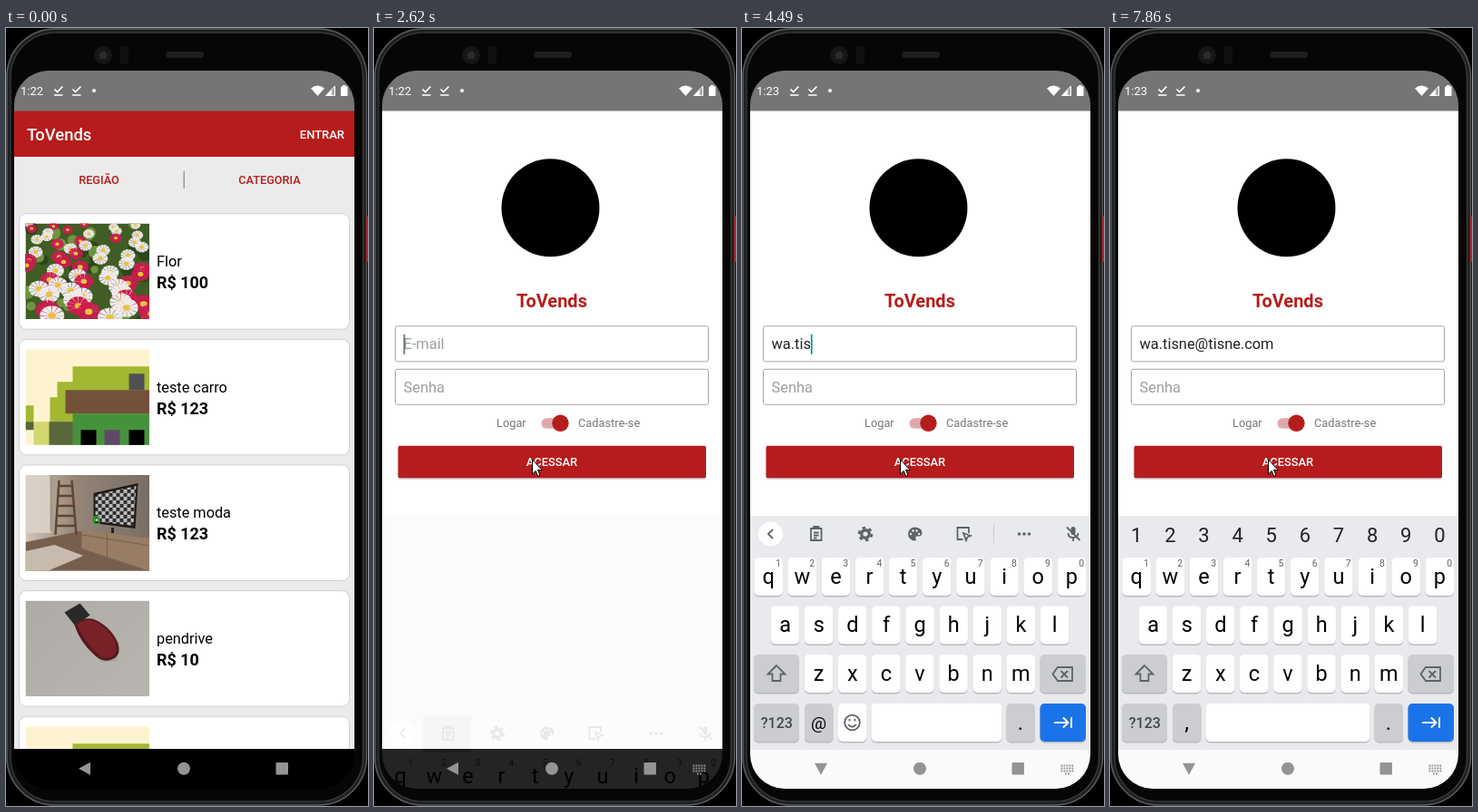
An HTML page that plays this animation: 399x858 px, repeating every 8000 ms.

```html
<!DOCTYPE html>
<html lang="pt">
<head>
<meta charset="utf-8">
<title>Login</title>
<style>
html, body { margin: 0; height: 100%; overflow: hidden; background: #000; }
svg { display: block; }
body > svg { width: 100vw; height: 100vh; }
text { font-family: Roboto, "Liberation Sans", sans-serif; white-space: pre; }
.m { text-anchor: middle; }
.b { font-weight: 500; }
.ico { fill: none; stroke: #5f6368; stroke-width: 1.8; }
</style>
</head>
<body>
<svg viewBox="0 0 399 858">
  <defs>
    <clipPath id="screen"><rect x="9" y="47" width="375" height="792" rx="38"/></clipPath>
    <clipPath id="page"><rect x="9" y="91" width="375" height="704"/></clipPath>
    <pattern id="check" width="8" height="8" patternUnits="userSpaceOnUse">
      <path fill="#bbb" d="M0 0h8v8h-8z"/><path fill="#2c2c2c" d="M0 0h4v4h-4zM4 4h4v4h-4z"/>
    </pattern>
    <linearGradient id="room" x2="1"><stop stop-color="#cfc5b8"/><stop offset=".4" stop-color="#948578"/><stop offset="1" stop-color="#7a6d63"/></linearGradient>
    <linearGradient id="desk" x2="1" y2="1"><stop stop-color="#aeaba7"/><stop offset="1" stop-color="#b9b5b0"/></linearGradient>
  </defs>

  <!-- phone body -->
  <rect width="399" height="858"/>
  <rect x="2" y="2" width="394" height="854" rx="52" fill="#060606" stroke="#1f2021" stroke-width="4"/>
  <rect x="1" y="1" width="396.5" height="856" rx="53" fill="none" stroke="#5a5d5f" stroke-width="1.4"/>
  <rect x="5" y="5" width="388.5" height="848" rx="49" fill="none" stroke="#3a3c3e" stroke-width="1.4"/>
  <rect x="397" y="208" width="2" height="50" fill="#b3202c"/>
  <circle cx="107" cy="30" r="10" fill="#151515"/><circle cx="107" cy="30" r="4.5" fill="#2b2b2d"/>
  <rect x="126" y="20" width="9" height="20" rx="2" fill="#111"/>
  <rect x="176" y="26" width="42" height="7" rx="3.5" fill="#1e1e1e"/>

  <g clip-path="url(#screen)">
    <rect x="9" y="47" width="375" height="792"/>

    <g id="list" clip-path="url(#page)">
      <rect x="9" y="91" width="375" height="704" fill="#ebebeb"/>
      <rect x="9" y="142" width="375" height="1.5" fill="#f4f4f4"/>
      <rect x="9" y="91" width="375" height="51" fill="#b71c1c"/>
      <text class="b" x="23" y="124" font-size="18.4" fill="#fff">ToVends</text>
      <text class="b" x="373" y="122" font-size="13" fill="#fff" text-anchor="end">ENTRAR</text>
      <g class="m b" font-size="12.7" fill="#b71c1c">
        <text x="102.5" y="172">REGIÃO</text><text x="290.5" y="172">CATEGORIA</text>
      </g>
      <rect x="195.5" y="158" width="1.5" height="19" fill="#9a9a9a"/>
      <g id="cards"></g>
    </g>

    <g id="login" clip-path="url(#page)">
      <rect x="9" y="91" width="375" height="704" fill="#fff"/>
      <g id="form">
        <circle cx="194.5" cy="327" r="54"/>
        <text class="m" x="196" y="437" font-size="20" font-weight="700" fill="#b71c1c">ToVends</text>
        <g fill="#fff" stroke="#a6a6a6">
          <rect x="23.5" y="457.5" width="345" height="39" rx="2"/>
          <rect x="23.5" y="505" width="345" height="39" rx="2"/>
        </g>
        <g font-size="16.4" fill="#9e9e9e">
          <text id="hint" x="32.5" y="483">E-mail</text>
          <text x="32.5" y="531">Senha</text>
          <text id="mail" x="32.5" y="483" fill="#212121"></text>
        </g>
        <rect id="caret" width="1.7" height="22"/>
        <g font-size="12.8" fill="#757575"><text x="135" y="569">Logar</text><text x="225" y="569">Cadastre-se</text></g>
        <rect x="184.5" y="559" width="29" height="11.5" rx="5.7" fill="#e0a9a9"/>
        <circle cx="205.5" cy="565.5" r="9.3" fill="#0002"/><circle cx="205.5" cy="564.5" r="9.2" fill="#b71c1c"/>
        <rect x="26.5" y="590.5" width="339.5" height="36" rx="2" fill="#0003"/>
        <rect x="26.5" y="589.5" width="339.5" height="35.5" rx="2" fill="#b71c1c"/>
        <text class="m b" x="196" y="612" font-size="12.9" fill="#fff">ACESSAR</text>
      </g>
    </g>

    <g id="board">
      <rect x="9" y="538" width="375" height="258" fill="#e8eaed"/>
      <rect x="9" y="796" width="375" height="43" fill="#fafafa"/>
      <g id="slide">
        <rect id="press" x="54" y="538" width="53" height="41" fill="#0003"/>
        <g id="tools">
          <circle cx="31.5" cy="558" r="13.5" fill="#fff"/>
          <path class="ico" d="M34 553l-5 5 5 5"/>
          <g class="ico">
            <path d="M76 552h11.500v13h-11.500zM79 552v-2h5.500v2M79 556.500h5.500M79 559.500h5.500M79 562.500h3.500"/>
            <circle cx="136" cy="558" r="4.300" stroke-width="3.400"/>
            <circle cx="136" cy="558" r="7" stroke-width="2.600" stroke-dasharray="3.660"/>
            <path d="M250 557v-6h-12.500v13h6M244 557l8 3-3.500 1.500-1.500 3.500z"/>
          </g>
          <path fill="#5f6368" d="M190.500 550.500a7.500 7.500 0 1 0 0 15q2-.5 1-2.500t1.500-2.500h2.500q3-.5 3-4a8 6 0 0 0-8-6z"/>
          <g fill="#e8eaed"><circle cx="186" cy="558" r="1.200"/><circle cx="188.500" cy="554.500" r="1.200"/><circle cx="192.500" cy="554.500" r="1.200"/><circle cx="195" cy="558" r="1.200"/></g>
          <path stroke="#c9cbce" d="M277.500 548v20"/>
          <g fill="#5f6368"><circle cx="305.500" cy="558" r="1.800"/><circle cx="311" cy="558" r="1.800"/><circle cx="316.500" cy="558" r="1.800"/></g>
        </g>
        <g id="hints">
          <circle cx="31.5" cy="558" r="13.5" fill="#fff"/>
          <path class="ico" d="M29 553l5 5-5 5"/>
          <path stroke="#c5c7ca" d="M140.5 547v23M250.500 547v23"/>
          <g class="m" fill="#4a4d51">
            <text id="word" x="91" y="564" font-size="16"></text>
            <g class="b" font-size="14.2"><text x="195" y="553">wattilo</text><text x="299" y="553">wattilo</text></g>
            <g font-size="11"><text x="195" y="569">@gmail.com</text><text x="299" y="569">@gmail.com.br</text></g>
          </g>
        </g>
        <g id="mic">
          <rect x="362.500" y="550" width="5" height="9" rx="2.500" fill="#5f6368"/>
          <path class="ico" stroke-width="1.500" d="M359.500 557q0 5 5.500 5t5.500-5M365 562v4M358 550.500l14.500 14.500"/>
        </g>
        <g id="digits" class="m" font-size="22" fill="#222"></g>
        <g id="keys" class="m"></g>
        <g id="mailKeys" class="m"></g>
        <g id="passKeys" class="m"></g>
      </g>
    </g>

    <g fill="#949494">
      <path id="back" d="M-7 0L6-7V7z"/>
      <circle cx="196" cy="816.800" r="7"/><rect x="297.500" y="810" width="13.500" height="13.500" rx="1"/>
      <path id="kbIcon" stroke="#949494" stroke-width="1.800" stroke-dasharray="1.800 1.200" d="M351.500 813.500h14M351.500 816.500h14M351.500 819.500h14M356 822.500h6"/>
    </g>

    <!-- status bar -->
    <rect x="9" y="47" width="375" height="44.500" fill="#757575"/>
    <g fill="#fff">
      <text id="clock" x="16" y="74" font-size="13"></text>
      <g fill="none" stroke="#fff" stroke-width="1.700"><path d="M53.500 67.500l3 3 6-6M53 74h9.500M73.500 67.500l3 3 6-6M73 74h9.500"/></g>
      <circle cx="97" cy="69" r="2"/>
      <path d="M336 66.500q7.500-6 15 0l-7.500 8.500z"/>
      <path d="M362.500 64v10.500h-10z" fill="#fff6" stroke="#fff"/><path d="M359 68v6.500h-6.500z"/>
      <path d="M371 63h3.500v1.500h2v10.500h-7.500v-10.500h2z"/>
    </g>
  </g>

  <path id="cursor" d="M.5 .5V16.500L4.200 13 6.700 18.800 9 17.800 6.600 12H11.500z" fill="#fff" stroke="#000"/>
</svg>

<script>
const $ = id => document.getElementById(id);
const LOOP = 8000, EMAIL = 'wa.tisne@tisne.com';
const rect = (x, y, w, h, fill, rx = 0) =>
  `<rect x="${x}" y="${y}" width="${w}" height="${h}" rx="${rx}" fill="${fill}"/>`;

// product pictures, 136.5 by 105.5
function flowers() {
  let seed = 11, out = rect(0, 0, 137, 106, '#3f5d24');
  const rnd = () => (seed = seed * 16807 % 2147483647) / 2147483647;
  for (let i = 0; i < 50; i++)
    out += `<circle cx="${rnd() * 137}" cy="${rnd() * 106}" r="${3 + rnd() * 5}" fill="${i % 2 ? '#6f9440' : '#2d451b'}"/>`;
  const count = 58;
  for (let i = 0; i < count; i++) {
    const y = 106 * (i / count) ** 1.2, x = (i * 53 + rnd() * 30) % 140, r = 4.5 + y / 14;
    const pink = rnd() < (y < 30 ? .3 : x < 90 ? .65 : .4);
    out += `<g transform="translate(${x} ${y}) scale(1 .8)">
      <circle r="${r * .65}" fill="none" stroke="${pink ? '#cf1a50' : '#f0eaec'}" stroke-width="${r}" stroke-dasharray="${r * .3} ${r * .04}"/>
      <circle r="${r * .36}" fill="#ecc23a"/></g>`;
  }
  return out;
}
const house = () => rect(0, 0, 137, 106, '#fef3d0') +
  '<path fill="#a2b832" d="M52 19h85v87h-110v-53h8v-17h17zM0 62h9v18h-9z"/>' +
  rect(9, 80, 18, 26, '#d4d76f') + rect(0, 80, 9, 9, '#59673a') + rect(26, 80, 27, 26, '#59673a') +
  rect(114, 27, 17, 18, '#4f5155') + rect(44, 45, 93, 26, '#75513b') + rect(52, 71, 85, 35, '#46923c') +
  rect(61, 89, 17, 17, '#000') + rect(87, 89, 17, 17, '#5e4a66') + rect(114, 89, 17, 17, '#000');
const room = () => rect(0, 0, 137, 106, 'url(#room)') +
  rect(0, 0, 28, 64, '#d9d0c5') + rect(27, 0, 3, 62, '#a59789') +
  `<path fill="#765f4d" d="M0 74L60 62 137 88V106H0z"/><path fill="#c6bbac" d="M0 84l32-7 32 12-40 17H0z"/>
  <path fill="none" stroke="#5f4631" stroke-width="2.500" d="M37 6L33 66M51 6l5 60M36 12h16M36 23h17M35 34h19M34 45h20M34 56h21"/>
  <path fill="#987c64" d="M62 61l75 9v36l-75-25z"/><path stroke="#75604d" fill="none" d="M62 66l75 12M90 65v25"/>
  <path fill="#1d1b1a" d="M75 20l49-11-3 50-46-6z"/><path fill="url(#check)" d="M77 22l45-10-3 44-42-5z"/>
  <path fill="none" stroke="#35a935" stroke-width="1.500" d="M76 46h5v8h-5z"/><path stroke="#222" stroke-width="3" d="M96 58v6"/>`;
const pendrive = () => rect(0, 0, 137, 106, 'url(#desk)') +
  `<path fill="#8884" d="M58 34l26 34 18-1-4-24z"/>
  <path fill="#29282a" d="M43 13l17-10 11 13-16 12z"/>
  <path fill="#571a1f" d="M54 27q6-9 20-7 20 8 28 27 4 14-7 18-10 4-19-5-16-14-22-33z"/>
  <path fill="#792228" d="M57 26q7-6 17-4 17 7 25 24 4 12-5 16-8 3-15-4-15-13-22-32z"/>`;

const goods = [['Flor', 100, flowers], ['teste carro', 123, house], ['teste moda', 123, room], ['pendrive', 10, pendrive], ['', '', house]];
$('cards').innerHTML = goods.map(([name, price, draw], i) => `<g transform="translate(0 ${i * 138.65})">
  <rect x="14.500" y="204.700" width="364" height="127.500" rx="8" fill="#fff" stroke="#d0d0d0"/>
  <svg x="21.500" y="215.600" width="136.500" height="105.500">${draw()}</svg>
  ${name && `<text x="166" y="263" font-size="16.300">${name}</text>
  <text x="166" y="287" font-size="17.900" font-weight="700">R$ ${price}</text>`}</g>`).join('');

// keyboard
const GREY = '#cbcdd2', PITCH = 37.13;
const label = (x, y, s, size = 23.5, extra = '') => `<text x="${x}" y="${y}" font-size="${size}" ${extra}>${s}</text>`;
const key = (x, y, w, fill = '#fff') => rect(x, y + 1, w, 42.5, '#b8babd', 5) + rect(x, y, w, 42, fill, 5);
const row = (chars, x, y) => [...chars].map((c, i) =>
  key(x + i * PITCH - 15.8, y, 31.5) + label(x + i * PITCH, y + 28.5, c)).join('');
const numbers = [...'1234567890'];
$('digits').innerHTML = numbers.map((c, i) => label(29.2 + i * PITCH, 567, c, 22)).join('');
$('keys').innerHTML = row('qwertyuiop', 29.2, 584) + row('asdfghjkl', 47.6, 637.5) + row('zxcvbnm', 84.6, 691) +
  numbers.map((c, i) => label(40 + i * PITCH, 594, c, 10.5, 'fill="#5f6368"')).join('') +
  key(13, 691, 50, GREY) + key(328.5, 691, 50.5, GREY) + key(13, 745, 50, GREY) +
  key(291.5, 745, 31.5, GREY) + key(328.5, 745, 50.5, '#1a73e8') +
  label(38.300, 772, '?123', 16, 'class="b" fill="#45484c"') + label(307, 774, '.', 24) +
  `<g class="ico" stroke="#3c4043"><path d="M38 703l-9.500 9.500h5v7.500h9v-7.500h5z"/>
  <path d="M348 705h16v15h-16l-5.500-7.500zM351.500 709l7.500 7.500M359 709l-7.500 7.500"/>
  <path style="stroke:#fff;stroke-width:2" d="M344 766h15M354 760.500l5.500 5.500-5.500 5.500M363 760v12"/></g>`;
$('mailKeys').innerHTML = key(69, 745, 31.5, GREY) + label(84.600, 773, '@', 19) +
  key(106, 745, 31.5) + key(142.5, 745, 144) +
  '<g class="ico"><circle cx="121.500" cy="766" r="8.300"/><path d="M117 768q4.500 5.500 9 0M118.500 762v2.500M124.500 762v2.500"/></g>';
$('passKeys').innerHTML = key(69, 745, 31.5, GREY) + label(84.600, 774, ',', 24) + key(105.5, 745, 181);

// timing
const at = (steps, t) => steps.reduce((v, [from, val]) => t >= from ? val : v, steps[0][1]);
const typed = [[0, 0], [3280, 1], [3390, 2], [4050, 3], [4260, 5], [4490, 6], [4810, 7], [4930, 8], [5240, 9],
  [5570, 11], [5780, 12], [6010, 14], [6330, 15], [6560, 16], [6670, 17], [6880, 18]];
const caretOn = [[0, 0], [2510, 1], [3050, 0], [3280, 1], [3930, 0], [4050, 1], [7860, 0]];
const boardDrop = [[0, 220], [2730, 70], [2840, 12], [2950, 0]];
const boardFade = [[0, 0], [2620, .14], [2730, .7], [2840, 1]];
const show = (id, on) => $(id).style.display = on ? '' : 'none';
const move = (id, x, y, more = '') => $(id).setAttribute('transform', `translate(${x} ${y}) ${more}`);
const smooth = u => u * u * (3 - 2 * u);
// progress in even jumps of about 111 ms
const jumps = (t, start, n) => Math.max(0, Math.min(1, Math.floor((t - start) / 111 + 1.001) / n));

function pointer(t) {
  if (t < 200) return [174, 223];
  if (t < 1850) {
    const u = smooth(jumps(t, 410, 7));
    return [172 + 171 * u, 179 - 63 * u - 42 * Math.sin(Math.PI * u)];
  }
  const u = smooth(jumps(t, 1960, 5));
  return [335 - 161 * u, 133 + 342.5 * u];
}

function draw(t) {
  const text = EMAIL.slice(0, at(typed, t)), password = t >= 7420;
  const hints = t >= 3280 && t < 4050;
  show('list', t < 1850);
  show('login', t >= 1850);
  move('form', 0, t < 2620 ? 0 : -128.7);
  $('clock').textContent = t < 2950 ? '1:22' : '1:23';
  $('mail').textContent = $('word').textContent = text;
  $('mail').style.textDecoration = hints ? 'underline' : 'none';
  show('hint', !text);
  show('caret', at(caretOn, t));
  const end = text && !password ? $('mail').getComputedTextLength() : 0;
  move('caret', 32.5 + end, password ? 513.5 : 466.5);
  $('caret').style.fill = text ? '#009688' : '#5f7572';

  show('board', t >= 2620);
  $('board').style.opacity = at(boardFade, t);
  move('slide', 0, at(boardDrop, t));
  show('press', t < 2730);
  show('tools', !hints && !password);
  show('hints', hints);
  show('mic', !password);
  show('digits', password);
  show('mailKeys', !password);
  show('passKeys', password);

  move('back', 87, 816.8, t < 2730 ? '' : 'rotate(-90)');
  show('kbIcon', t >= 2620);
  show('cursor', t >= 100);
  move('cursor', ...pointer(t));
}

let start;
function frame(now) {
  start ??= now;
  draw((now - start) % LOOP);
  requestAnimationFrame(frame);
}
draw(0);
requestAnimationFrame(frame);
</script>
</body>
</html>
```
